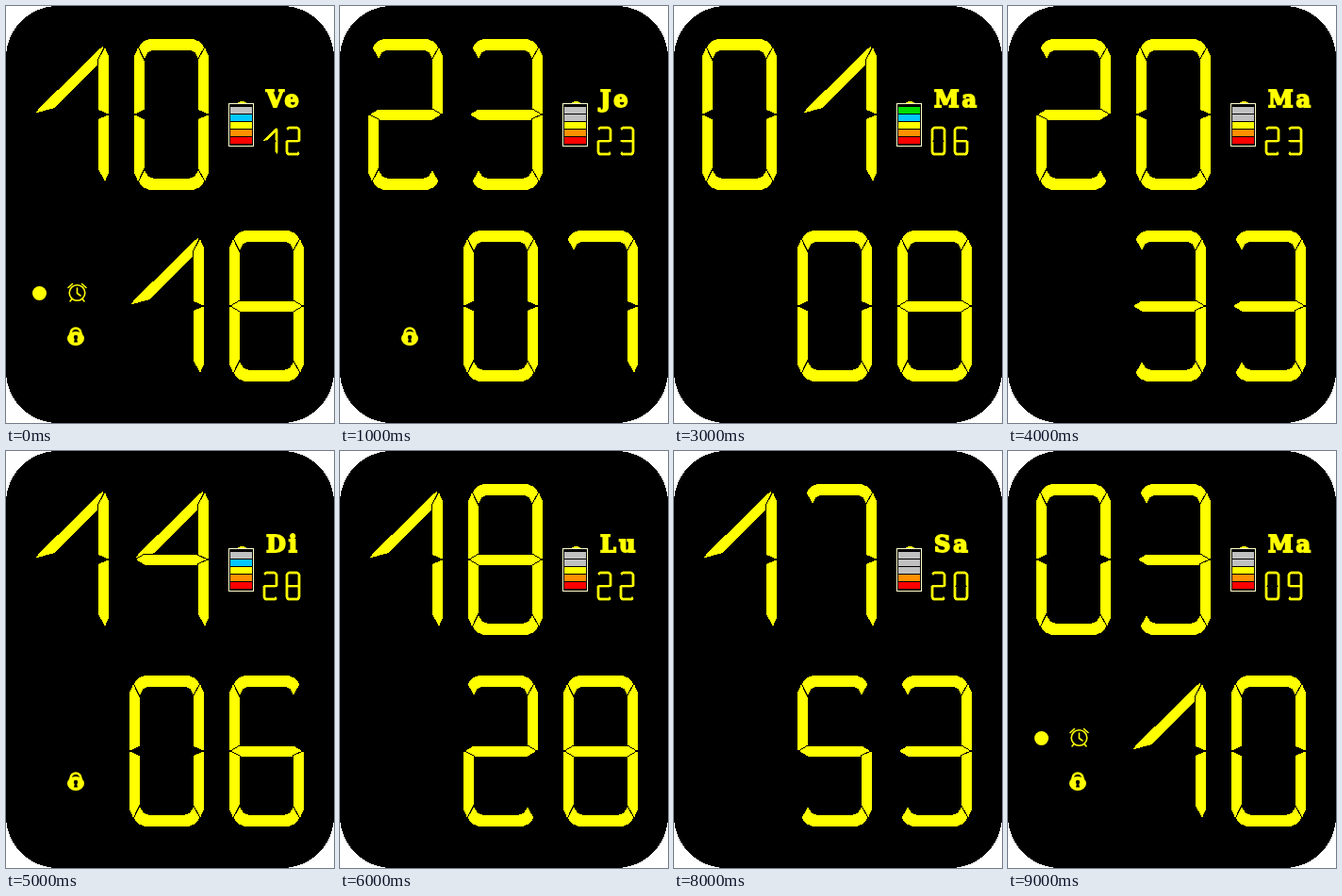
An HTML page that plays this animation: 348x442 px, repeating every 10 s.

```html
<!DOCTYPE html>
<html lang="fr">
<head>
<meta charset="utf-8">
<title>Digital clock</title>
<style>
html, body { margin: 0; width: 100%; height: 100%; overflow: hidden; background: #fff; }
svg { display: block; width: 348px; height: 442px; }
.digits { fill: #ff0; stroke: #000; stroke-width: 1; shape-rendering: crispEdges; }
.small { stroke: #ff0; stroke-width: 2; }
.day { font: 900 24px "DejaVu Serif", "Noto Serif", serif; fill: #ff0; stroke: #ff0; stroke-width: 1.8; letter-spacing: 3px; }
</style>
</head>
<body>
<svg viewBox="0 0 348 442">
  <rect width="348" height="442" rx="55" shape-rendering="crispEdges"/>
  <g id="face"></g>
</svg>
<script>
// Segments a-g of a 79 x 160 digit; "s" is the slanted stroke of 1 and 4.
const SEGMENTS = {
  a: "4,9 6,6 10,2 16,-.5 63,-.5 69,2 73,6 75,9 68,22 64,14.5 59,12 20,12 15,14.5 11,22",
  b: "75,8 79.5,18 79.5,79 78,80 67,75 67,23",
  c: "79.5,81 79.5,142 75,152 67,137 67,85 78,80",
  d: "4,151 6,154 10,158 16,160.5 63,160.5 69,158 73,154 75,151 68,138 64,145 59,147 20,147 15,145 11,138",
  e: "-.5,81 1,80 11,85 11,137 4,152 -.5,142",
  f: "4,8 11,23 11,75 1,80 -.5,79 -.5,18",
  g: "1,80 11,74 68,74 78,80 68,86 11,86",
  s: "1,79 4,74 69,10 75,6 68,23 68,27.5 22,73.5"
};
const DIGITS = ["abcdef", "sbc", "abged", "abgcd", "sgbc", "afgcd", "afgedc", "abc", "abcdefg", "abcdfg"];
const LEVEL_COLORS = ["#f00", "#ff9000", "#ff0", "#00c8ff", "#0d0"];

// One state per second: hours, minutes, day, date, battery level, icons.
const STATES = [
  ["10", "18", "Ve", "12", 4, "bal"],
  ["23", "07", "Je", "23", 3, "l"],
  ["22", "35", "Ma", "16", 4, "bal"],
  ["01", "08", "Ma", "06", 5, ""],
  ["20", "33", "Ma", "23", 3, ""],
  ["14", "06", "Di", "28", 4, "l"],
  ["18", "28", "Lu", "22", 3, ""],
  ["09", "18", "Ve", "02", 1, ""],
  ["17", "53", "Sa", "20", 2, ""],
  ["03", "10", "Ma", "09", 3, "bal"]
];

const ICONS = {
  b: `<circle cx="35.5" cy="304.5" r="7.5" fill="#ff0"/>`,
  a: `<g fill="none" stroke="#ff0" stroke-width="1.6" stroke-linecap="round">
      <circle cx="75.5" cy="304" r="8.3"/>
      <path d="M75.5 299V304.5L79 307M66 298.5L70.5 294.5M85 298.5L80.5 294.5M70 310.5L68 313M81 310.5L83 313"/></g>`,
  l: `<path d="M68.5 349V347a5.5 5.5 0 0 1 11 0V349" fill="none" stroke="#ff0" stroke-width="2.6"/>
      <ellipse cx="74" cy="352.5" rx="9" ry="7.5" fill="#ff0"/>
      <path d="M73 352L72 356.5H76L75 352Z"/><circle cx="74" cy="351" r="2.2"/>`
};

function number(text, x, y, step, scale = 1) {
  const digits = [...text].map((digit, i) =>
    `<g transform="translate(${x + i * step} ${y}) scale(${scale})">` +
    [...DIGITS[digit]].map(s => `<polygon points="${SEGMENTS[s]}"/>`).join("") + "</g>");
  return `<g class="digits ${scale < 1 ? "small" : ""}">${digits.join("")}</g>`;
}

function battery(level) {
  const cells = LEVEL_COLORS.map((color, i) =>
    `<rect x="238" y="${139 - 8 * i}" width="23" height="7" fill="${i < level ? color : "#c0c0c0"}"/>`);
  return `<g shape-rendering="crispEdges"><path d="M246 103v-1h2v-1h5v1h2v1z" fill="#ff0"/>
    <rect x="236.5" y="103.5" width="26" height="45" fill="none" stroke="#ffc"/>${cells.join("")}</g>`;
}

const face = document.getElementById("face");
let shown = -1;

function draw(now) {
  const index = Math.floor(now / 1000) % STATES.length;
  if (index !== shown) {
    shown = index;
    const [hours, minutes, day, date, level, icons] = STATES[index];
    face.innerHTML = number(hours, 30, 35, 106) + number(minutes, 131, 238, 106) +
      number(date, 273, 128, 24, 0.19) + battery(level) +
      `<text class="day" x="276" y="107">${day}</text>` +
      [...icons].map(name => ICONS[name]).join("");
  }
  requestAnimationFrame(draw);
}
draw(performance.now());
</script>
</body>
</html>
```
